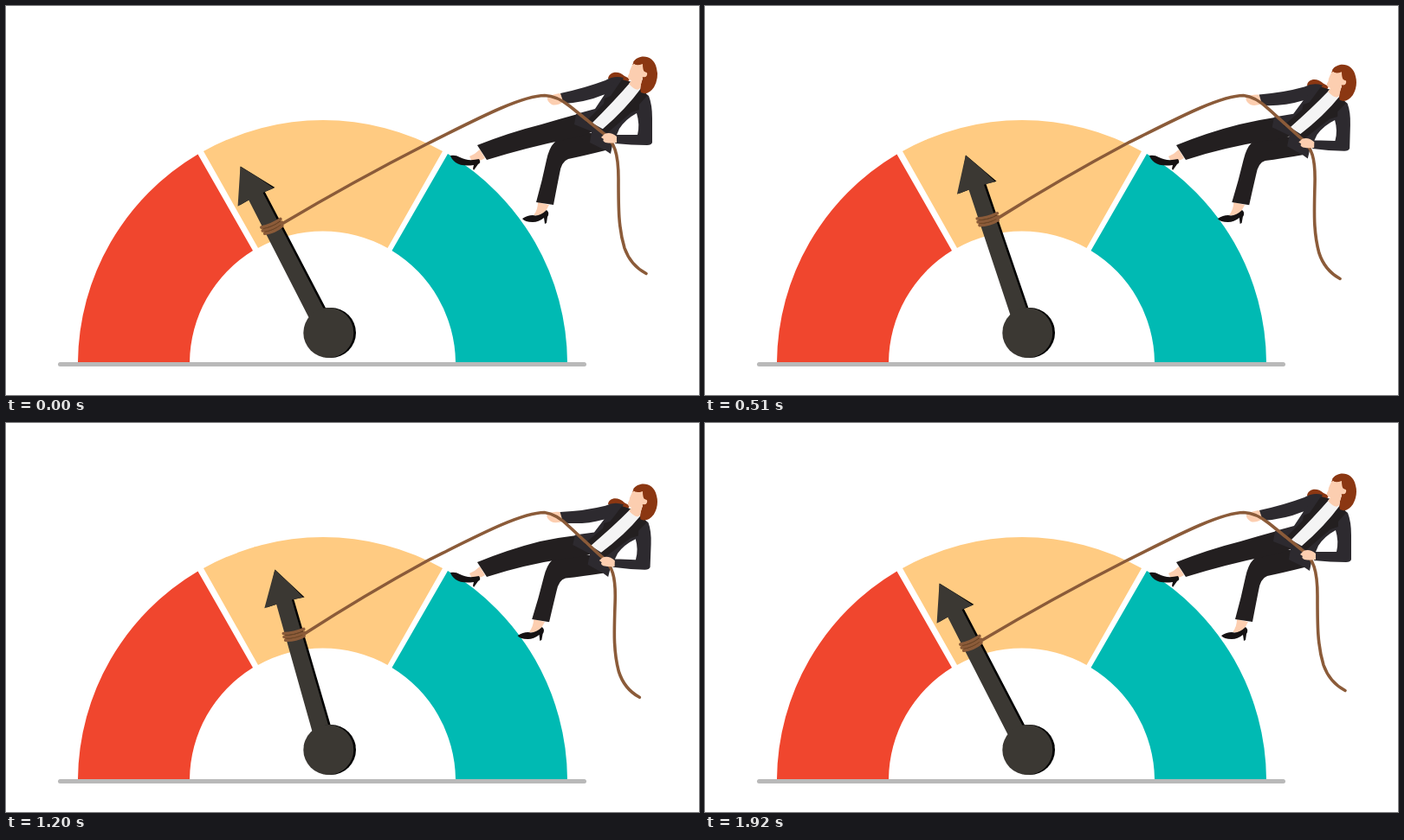
An HTML page for the animation above (2280 ms loop, 800 px wide and 450 px high).

```html
<!DOCTYPE html>
<html lang="en">
<head>
<meta charset="utf-8">
<title>Pulling the gauge</title>
<style>
html, body { margin: 0; width: 100%; height: 100%; overflow: hidden; background: #fff; }
svg { display: block; width: 100vw; height: 100vh; }
</style>
</head>
<body>
<svg id="stage" viewBox="0 0 800 450" xmlns="http://www.w3.org/2000/svg">
  <g id="gauge"></g>
  <path d="M62.5 414.5H667.5" stroke="#b9b9b9" stroke-width="5" stroke-linecap="round"/>
  <g id="arrow">
    <path d="M-10 -18 L-9 -178 L-22 -177.500 L-.5 -217 L23.500 -177 L11 -178 L11.500 -18Z" fill="#000"/>
    <path d="M-11 -18 L-10 -178 L-24.500 -177.500 L-.7 -217 Q12 -197 22 -177 L8.500 -178 L9 -18Z" fill="#3b3833"/>
  </g>
  <circle cx="375" cy="378" r="29" fill="#000"/>
  <circle cx="372.3" cy="378" r="29" fill="#3b3833"/>
  <g id="tie">
    <g transform="rotate(6 0 -138)" fill="none" stroke="#8b5b39" stroke-width="3.6" stroke-linecap="round">
      <path d="M-12 -142 Q0 -140 12 -143 M-12 -138 Q0 -135.500 12 -139 M-11 -134 Q0 -131.500 11 -135"/>
      <path d="M-11 -140 Q0 -137.500 11 -141 M-11 -136 Q0 -133.500 11 -137" stroke="#70441f" stroke-width=".7"/>
    </g>
  </g>
  <g id="person"></g>
</svg>
<script>
const LOOP = 2280, STEP = 30, PULL = 890, REST = 1935;
const PIVOT = { x: 371, y: 378 };
const NS = 'http://www.w3.org/2000/svg';
const byId = id => document.getElementById(id);
const clamp = v => Math.max(0, Math.min(1, v));

function addPath(parent, attrs) {
  const path = document.createElementNS(NS, 'path');
  for (const name in attrs) path.setAttribute(name, attrs[name]);
  return byId(parent).appendChild(path);
}

// Gauge: ring sectors between two radii, each given by its corner points.
function sector(fill, outerA, outerB, innerB, innerA) {
  addPath('gauge', { fill, d: `M${outerA} A282.5,282.5 0 0 1 ${outerB} L${innerB} A153.5,153.5 0 0 0 ${innerA}Z` });
}
sector('#f0462e', '83,412', '221.500,171.500', '285,283', '212,412');
sector('#ffcb82', '228,168', '504,168', '440.500,280', '291,280');
sector('#00bab3', '510,171', '648,412', '519,412', '445.500,283');

const SUIT = '#2d2a2f', BLACK = '#231f20', SKIN = '#fcceb0', HAIR = '#8b3712', ROPE = '#8b5b39';

// Back to front, in the upright pose.
const shapes = [
  // hair behind the shoulder
  [HAIR, 'M695,84 C696,76 707,74 714,81 L720,84 L716,92 L704,86Z'],
  // near foot
  [SKIN, 'M535,174 Q542,171 547,166 L553,176 Q545,181 538,180Z'],
  ['#151213', 'M513,173 Q519,172 524,175 Q533,180 546,177 Q549,181 545,183 L540,190 L539,188 L540,184 Q526,186 519,181 Q514,177 513,173Z'],
  // far foot
  [SKIN, 'M614,227 L627,230 Q624,237 619,242 L609,242 Q614,236 614,227Z'],
  ['#151213', 'M596,246 Q602,242 608,242 Q616,244 624,236 Q628,239 625,244 L624,251 L622,252 L621,245 Q615,250 608,250 Q599,250 596,246Z'],
  // legs
  [BLACK, 'M692,148 L664,146 Q643,148 633,158 Q627,164 624,178 Q619,202 612,227 L632,230 Q635,214 639,194 Q641,180 649,177 Q668,173 692,167Z'],
  [BLACK, 'M544,161 Q582,146 618,137 Q638,131 660,125 L686,140 Q672,150 648,154 Q600,164 555,178Z'],
  // far arm
  [SKIN, 'M643,101 Q632,101 625,106 Q624,110 630,114 Q636,116 645,110Z'],
  [SUIT, 'M713,83 Q702,80 692,86 Q668,95 640,101 L644,113 Q670,111 689,103 L704,99Z'],
  // jacket, shirt, lapels
  [SUIT, 'M705,84 L723,88 L742,104 Q746,114 746,130 L746,158 Q745,161 740,161 Q722,161 703,159 L704,149 L729,149 Q732,137 728,124 Q715,131 708,142 L700,161 L698,171 L692,167 L674,158 L676,145 L656,137 L658,125 L680,119 Q691,101 705,84Z'],
  ['#f4f4f4', 'M719,88 L735,96 Q719,120 692,144 L676,135 Q697,112 719,88Z'],
  [BLACK, 'M711,85 L721,88 Q702,110 675,137 L669,134 L690,113 L691,107 L698,104Z'],
  [BLACK, 'M734,94 L740,104 L731,114 L731,120 L722,123 L694,147 L688,143 Q715,120 734,94Z'],
  // head
  [HAIR, 'M724,65 C730,55 748,56 751,72 Q754,83 748,94 Q741,104 733,100 Q731,94 735,84Z'],
  [SKIN, 'M724,66 Q727,70 735,67 Q735,74 737,76 Q741,76 740,80 Q739,83 735,82 L732,95 Q728,100 719,90 L722,86 Q717,85 718,81 Q720,78 720,75 Q722,70 724,66Z'],
  [HAIR, 'M723,68 Q727,59 738,59 L745,73 L739,77 Q735,74 736,67 Q729,64 723,68Z'],
];
const hand = [SKIN, 'M705,151 Q698,145 691,148 L687,152 L690,154 Q688,156 692,158 Q699,159 705,158Z'];

const parts = [];
const addShape = ([fill, d]) => parts.push({ d, path: addPath('person', { fill }) });
shapes.forEach(addShape);
const rope = addPath('person', { fill: 'none', stroke: ROPE, 'stroke-width': 3.6, 'stroke-linecap': 'round' });
addShape(hand);

const ROPE_BODY = '487,159 C543,131 595,103.500 622,103.500 Q636,104 651,116 L688,146 C703,156 707,172 707,200 C707,235 707,257 714,280 Q721,300 739,309.500';

// Leaning back: points sink towards the head, and slide left the lower they are.
function lean(x, y, p) {
  const reach = 1 - clamp((x - 630) / 110);
  const sink = 15 * (1 - reach * reach) * Math.max(.65, Math.min(1, 1 - (y - 90) / 260));
  const slide = -.044 * Math.max(0, y - 90) * clamp((x - 555) / 40);
  return `${(x + slide * p).toFixed(2)},${(y + sink * p).toFixed(2)}`;
}
const leanPath = (d, p) => d.replace(/([\d.]+),([\d.]+)/g, (_, x, y) => lean(+x, +y, p));

function pull(t) {
  if (t < PULL) return (1 - Math.cos(Math.PI * t / PULL)) / 2;
  return (1 + Math.cos(Math.PI * clamp((t - PULL) / (REST - PULL)))) / 2;
}

function draw(time) {
  const t = Math.min(1920, Math.floor((time % LOOP) / STEP) * STEP);
  const p = pull(t);
  const angle = -27.4 + 14.2 * p;
  const turn = `translate(${PIVOT.x} ${PIVOT.y}) rotate(${angle})`;
  byId('arrow').setAttribute('transform', turn);
  byId('tie').setAttribute('transform', turn);
  for (const { d, path } of parts) path.setAttribute('d', leanPath(d, p));

  // The rope runs almost straight from the knot to the gauge's rim.
  const a = angle * Math.PI / 180, side = 11, up = -136;
  const knotX = PIVOT.x + side * Math.cos(a) - up * Math.sin(a);
  const knotY = PIVOT.y + side * Math.sin(a) + up * Math.cos(a);
  const bend = `${(knotX + 487) / 2 - 1} ${(knotY + 159) / 2 - 3}`;
  rope.setAttribute('d', `M${knotX} ${knotY} Q${bend} ` + leanPath(ROPE_BODY, p));
}

const start = performance.now();
function tick() {
  draw(performance.now() - start);
  requestAnimationFrame(tick);
}
tick();
</script>
</body>
</html>
```
